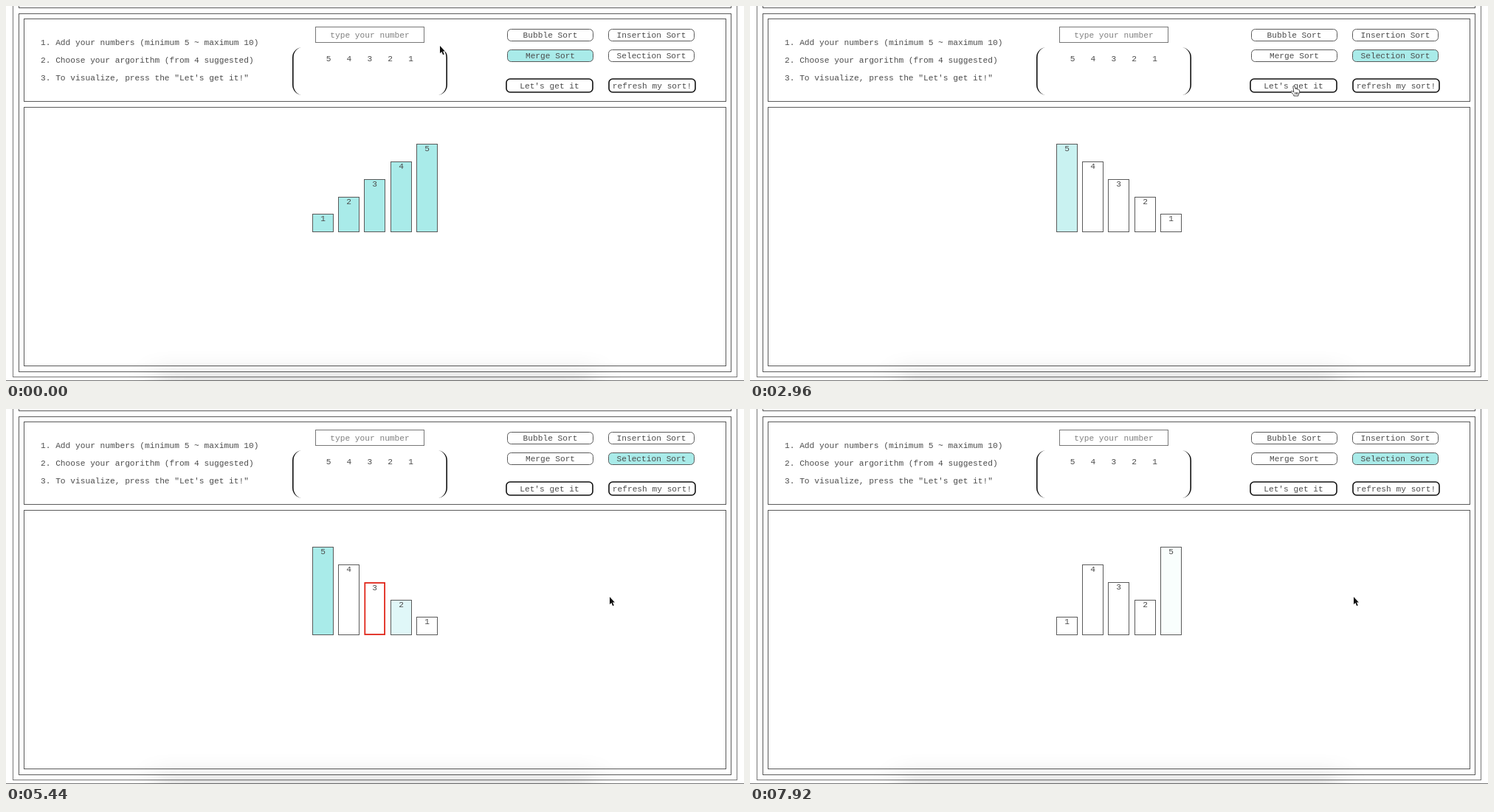
These frames come from a looping animation (1000x509 px, 8000 ms). An HTML page with a canvas:

```html
<!DOCTYPE html>
<html lang="en">
<head>
<meta charset="utf-8">
<title>Sorting visualizer</title>
<style>
  html, body { margin: 0; width: 100%; height: 100%; overflow: hidden; background: #fff; }
  canvas { display: block; width: 100vw; height: 100vh; }
</style>
</head>
<body>
<canvas id="stage" width="1000" height="509"></canvas>
<script>
const ctx = document.getElementById('stage').getContext('2d');
const LOOP = 8000, STEP = 80;
const INK = '#5a5a5a', AQUA = [169, 235, 233], PALE = [224, 247, 248], WHITE = [255, 255, 255];
const FONT = '11.2px "Liberation Mono", "Courier New", monospace';

const SELECT_AT = 1600, START_AT = 2480, COMPARE_AT = 3600, COMPARE_MS = 800;
const SWAP_AT = 7120, SWAP_END = 7600;

// Cursor hot points: [time, x, y]
const PATH = [
  [0, 588, 54], [400, 730, 62], [560, 730, 62], [1360, 876, 62],
  [1680, 876, 62], [2240, 738, 108], [3000, 738, 108], [3520, 818, 255], [LOOP, 818, 255]
];

const BUTTONS = [
  { label: 'Bubble Sort', x: 679, y: 31 },
  { label: 'Insertion Sort', x: 816, y: 31 },
  { label: 'Merge Sort', x: 679, y: 59 },
  { label: 'Selection Sort', x: 816, y: 59 },
  { label: "Let's get it", x: 678, y: 99, bold: true },
  { label: 'refresh my sort!', x: 817, y: 99, bold: true }
];

const clamp = v => Math.max(0, Math.min(1, v));
const progress = (t, from, to) => clamp((t - from) / (to - from));
const ease = p => p * p * (3 - 2 * p);
const mix = (a, b, p) => a.map((v, i) => v + (b[i] - v) * p);
const rgb = c => `rgb(${c.map(Math.round).join(',')})`;

function text(str, x, y, align = 'center', color = '#4c4c4c') {
  ctx.textAlign = align;
  ctx.fillStyle = color;
  ctx.fillText(str, x, y);
}

function box(left, top, right, bottom, color = INK) {
  ctx.strokeStyle = color;
  ctx.lineWidth = 1;
  ctx.strokeRect(left + .5, top + .5, right - left, bottom - top);
}

function drawFrames() {
  box(9, -5, 990, 503, '#777');
  box(17, -5, 982, 2);
  box(17, 10, 982, 496);
  box(24, 17, 975, 129);
  box(24, 137, 975, 488);
  ctx.fillStyle = '#777';
  ctx.fillRect(0, 508, 1000, 1);
}

function drawPanel() {
  text('1. Add your numbers (minimum 5 ~ maximum 10)', 47, 53, 'left');
  text('2. Choose your argorithm (from 4 suggested)', 47, 77, 'left');
  text('3. To visualize, press the "Let\'s get it!"', 47, 101, 'left');
  box(419, 28, 566, 49, '#777');
  text('type your number', 493, 43, 'center', '#808080');

  ctx.fillStyle = '#111';
  ctx.beginPath();
  ctx.roundRect(388, 56, 210, 65, 14);
  ctx.roundRect(389.6, 56, 206.8, 65, { x: 12.4, y: 14 });
  ctx.fill('evenodd');
  for (let i = 0; i < 5; i++) text(5 - i, 437 + 27.9 * i, 75);
}

function drawButtons(t) {
  const chosen = t < SELECT_AT ? 'Merge Sort' : 'Selection Sort';
  for (const { label, x, y, bold } of BUTTONS) {
    ctx.beginPath();
    if (bold) ctx.roundRect(x, y, 117, 18, 5);
    else ctx.roundRect(x + .5, y + .5, 116, 16, 5);
    ctx.fillStyle = label === chosen ? rgb(AQUA) : '#fff';
    ctx.fill();
    ctx.strokeStyle = bold ? '#111' : INK;
    ctx.lineWidth = bold ? 1.6 : 1;
    ctx.stroke();
    text(label, x + 58.5, y + (bold ? 13 : 12));
  }
}

function drawBar(value, slot, color, red) {
  const x = Math.floor(415.6 + 35.15 * slot);
  const y = Math.round(306.3 - 23.85 * value);
  ctx.fillStyle = rgb(color);
  ctx.fillRect(x, y, 29, 307 - y);
  if (red) {
    ctx.strokeStyle = '#e0261a';
    ctx.lineWidth = 1.8;
    ctx.strokeRect(x + 1.3, y + 1, 26.8, 305 - y);
  } else {
    box(x, y, x + 28, 306);
  }
  text(value, x + 14.5, y + (red ? 11 : 10));
}

function drawBars(t) {
  if (t < START_AT) {
    for (let v = 1; v <= 5; v++) drawBar(v, v - 1, AQUA, false);
    return;
  }
  const round = t < COMPARE_AT ? -1 : Math.floor((t - COMPARE_AT) / COMPARE_MS);
  const swap = ease(progress(t, SWAP_AT, SWAP_END));
  const glow = progress(t, 2640, 3150) * (1 - progress(t, 7520, 7950));
  for (let i = 1; i < 5; i++) {
    const last = i === 4;
    const color = round === i - 1 ? PALE : WHITE;
    const red = round === i && t < SWAP_END;
    drawBar(5 - i, last ? 4 - 4 * swap : i, color, red);
  }
  drawBar(5, 4 * swap, mix(WHITE, AQUA, glow), round === 0);
}

function drawDockShadow() {
  ctx.save();
  ctx.shadowColor = 'rgba(0,0,0,.2)';
  ctx.shadowBlur = 38;
  ctx.shadowOffsetY = -1000;
  ctx.fillRect(198, 1505, 604, 60);
  ctx.restore();
}

function cursorAt(t) {
  const i = PATH.findIndex((p, n) => n > 0 && t <= p[0]);
  const [a, b] = [PATH[i - 1], PATH[i]];
  const p = ease(progress(t, a[0], b[0]));
  return mix(a, b, p).slice(1);
}

const ARROW = new Path2D('M0 0V10.2L2.3 8L4.1 12.2L5.8 11.4L4 7.4H6.9Z');
const HAND = new Path2D('M-2.2 1.2Q-1 -.4 .3 1.2L1.2 4.6Q2.6 3.8 3.3 5Q4.8 4.3 5.3 5.7Q6.6 5.3 6.6 7.2V9.6Q6.2 11.4 5 12.4V14H-1.2V12.6L-5 8.6Q-5 6.8 -3.4 7.5L-1.2 8.8Z');
const KNUCKLES = new Path2D('M.7 9V12M2.5 9V12M4.2 9V12');

function drawCursor(t) {
  const [x, y] = cursorAt(t);
  const over = BUTTONS.some(b => x > b.x && x < b.x + 117 && y >= b.y && y < b.y + 18);
  ctx.save();
  ctx.translate(x, y);
  ctx.lineJoin = 'round';
  if (over) {
    ctx.fillStyle = '#fff';
    ctx.strokeStyle = '#333';
    ctx.lineWidth = .9;
    ctx.fill(HAND);
    ctx.stroke(HAND);
    ctx.stroke(KNUCKLES);
  } else {
    ctx.strokeStyle = '#fff';
    ctx.lineWidth = 2;
    ctx.stroke(ARROW);
    ctx.fillStyle = '#111';
    ctx.fill(ARROW);
  }
  ctx.restore();
}

function draw(now) {
  const t = Math.floor((now % LOOP) / STEP) * STEP;
  ctx.fillStyle = '#fff';
  ctx.fillRect(0, 0, 1000, 509);
  ctx.font = FONT;
  drawFrames();
  drawPanel();
  drawButtons(t);
  drawBars(t);
  drawDockShadow();
  drawCursor(t);
}

const start = performance.now();
function tick() {
  draw(performance.now() - start);
  requestAnimationFrame(tick);
}
tick();
</script>
</body>
</html>
```
